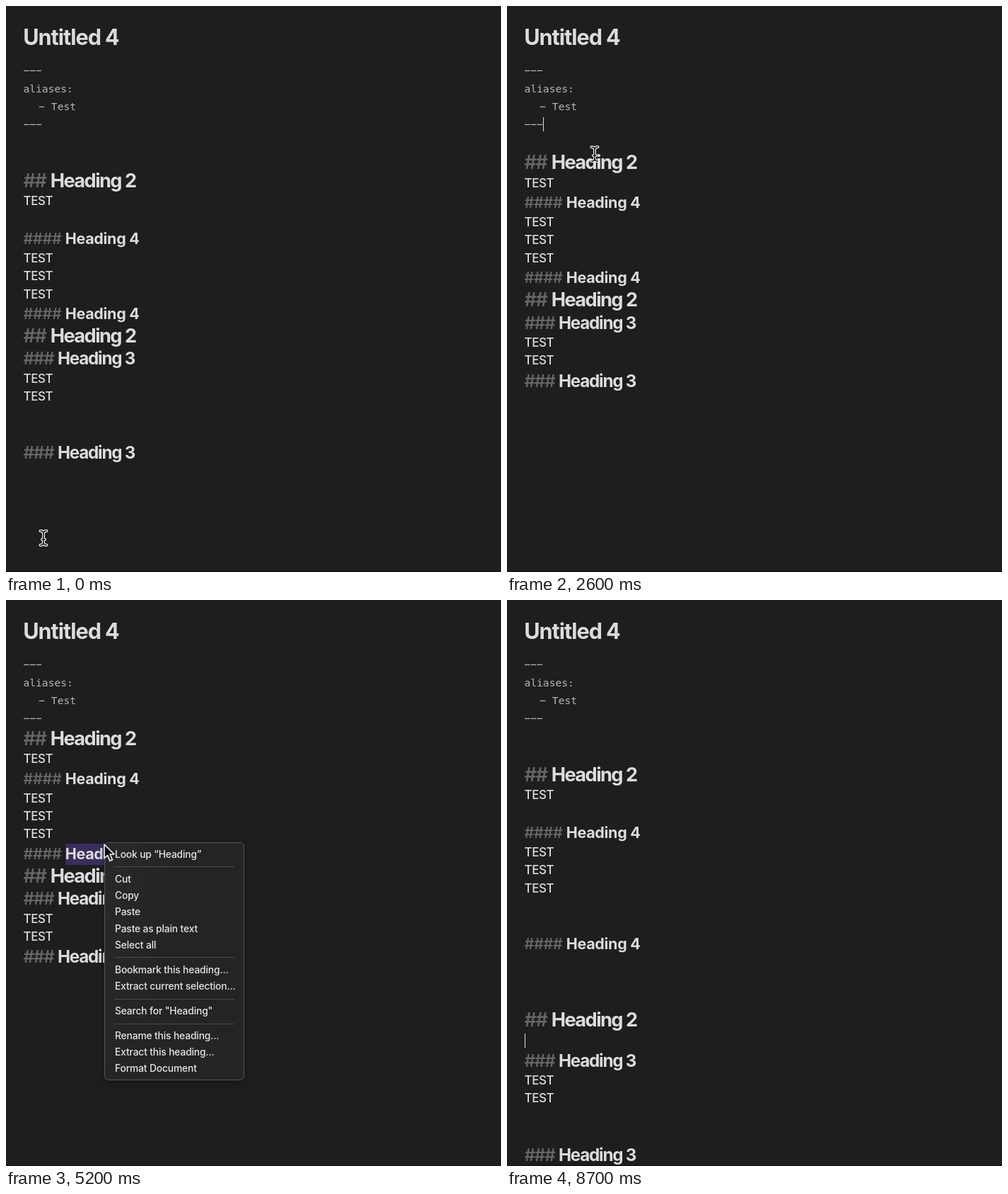
An HTML page for the animation above (8800 ms loop, 700 by 799 pixels).

```html
<!DOCTYPE html>
<html lang="en">
<head>
<meta charset="utf-8">
<title>Format headings</title>
<style>
  html, body { margin: 0; width: 100%; height: 100%; overflow: hidden; background: #1e1e1e; }
  #stage { position: relative; width: 700px; height: 799px; overflow: hidden; color: #dcdcdc;
    font: 450 17px/25.4px Inter, sans-serif; font-optical-sizing: none; white-space: pre; }
  #stage > * { position: absolute; }
  #title { left: 24.2px; top: 24px; font-size: 30.6px; line-height: 40px; font-weight: 700; letter-spacing: -.034em; }
  #yaml { left: 24.5px; top: 78.2px; color: #b6b6b6; font: 14.6px/25.4px "DejaVu Sans Mono", monospace; }
  #yaml .item { padding-left: 21.8px; }
  #doc { left: 24.5px; top: 179.9px; }
  #doc div { position: relative; height: 25.4px; letter-spacing: -.024em; }
  #doc .h { color: #666; font-weight: 600; }
  #doc b { position: absolute; top: 0; color: #dcdcdc; font-weight: 700; }
  #doc i { display: inline-block; font-style: normal; }
  #doc .h2 { font-size: 27.2px; height: 32.5px; line-height: 32.5px; letter-spacing: -.057em; }
  #doc .h3 { font-size: 24.2px; height: 31.35px; line-height: 31.35px; letter-spacing: -.05em; }
  #doc .h4 { font-size: 21.5px; height: 29.9px; line-height: 29.9px; letter-spacing: -.014em; }
  .h2 b { left: 38.2px; } .h3 b { left: 48.4px; } .h4 b { left: 59.2px; }
  #doc .picked { background: #3a2e5c; }
  #caret { position: absolute; width: 1px; height: 20px; margin-top: 2.7px; background: #e0e0e0; }
  #menu { left: 139px; top: 342.4px; width: 198px; height: 335.6px; box-sizing: border-box; padding: 4.4px;
    border: 1px solid #555; border-radius: 6px; background: linear-gradient(100deg, #292929, #242424 40%);
    box-shadow: 0 3px 10px #0005; color: #e6e6e6; font-size: 13.8px; line-height: 23.3px; letter-spacing: -.01em; }
  #menu div { height: 23.3px; padding-left: 9.6px; border-radius: 4px; }
  #menu .on { background: #1467c6; color: #fff; }
  #menu hr { height: 1px; margin: 5.3px 9px; border: 0; background: #4b4b4b; }
  #edge { left: 0; top: 798px; width: 700px; height: 1px; background: #101010; }
  #mouse { left: 0; top: 0; width: 32px; height: 32px; overflow: visible; }
  #beam { fill: none; stroke: #f2f2f2; stroke-width: 4; stroke-linecap: round; }
  #beam .core { stroke: #1a1a1a; stroke-width: 1.6; }
</style>
</head>
<body>
<div id="stage">
  <div id="title">Untitled 4</div>
  <div id="yaml"><div>−−−</div><div>aliases:</div><div class="item">− Test</div><div>−−−</div></div>
  <div id="doc"></div>
  <div id="menu"></div>
  <div id="edge"></div>
  <svg id="mouse">
    <g id="beam"></g>
    <path id="arrow" fill="#0a0a0a" stroke="#f2f2f2" stroke-width="1.4" stroke-linejoin="round"
      transform="scale(1.15)" d="M0 0V17L4 13.4 7 20.3 10 19 7 12.2H12.2Z"/>
  </svg>
</div>
<script>
const LOOP = 8800, STEP = 100, GLIDE = 500, BLINK = 500;
const DOC_TOP = 179.9, HEIGHTS = { 2: 32.5, 3: 31.35, 4: 29.9 }, LINE = 25.4;

const $ = id => document.getElementById(id);
const show = (el, on) => el.style.display = on ? "" : "none";
const doc = $("doc"), menu = $("menu"), mouse = $("mouse");
const caret = document.createElement("span");
caret.id = "caret";

const beam = "M-4.5-10Q0-10 0-6.5V6.5Q0 10-4.5 10M4.5-10Q0-10 0-6.5M4.5 10Q0 10 0 6.5M-2 2H2";
$("beam").innerHTML = `<path d="${beam}"/><path class="core" d="${beam}"/>`;

menu.innerHTML = [
  ["Look up “Heading”"],
  ["Cut", "Copy", "Paste", "Paste as plain text", "Select all"],
  ["Bookmark this heading...", "Extract current selection..."],
  ['Search for "Heading"'],
  ["Rename this heading...", "Extract this heading...", "Format Document"]
].map(group => group.map(s => `<div>${s}</div>`).join("")).join("<hr>");

// One character per line: a digit is a heading of that level, T is text, a dot is blank.
const START = "..2T.4TTT423TT..3";

// What the user does; steps with a point bring the mouse there by that time.
const steps = [
  { at: 0, act: "hover", to: [53, 751] },
  { at: 400, act: "hover", to: [206, 640] },
  { at: 800, act: "click", to: [150, 603] },
  { at: 1000, act: "backspace" },
  { at: 1200, act: "backspace" },
  { at: 1700, act: "click", to: [78, 298] },
  { at: 1900, act: "backspace" },
  { at: 2300, act: "click", to: [70, 194] },
  { at: 2500, act: "backspace" },
  { at: 2600, act: "hover", to: [124, 209] },
  { at: 2700, act: "del" },
  { at: 3100, act: "click", to: [47, 169] },
  { at: 3800, act: "enter" },
  { at: 4400, act: "backspace" },
  { at: 5200, act: "menu", to: [139, 345] },
  { at: 5500, act: "hover", to: [195, 684] },
  { at: 5700, act: "hover", to: [209.5, 666] },
  { at: 6000, act: "format" },
  { at: 6500, act: "hover", to: [422, 615] },
  { at: 6700, act: "click", to: [422, 615] },
  { at: 8000, act: "leave", to: [492, 186] }
];
const moves = steps.filter(s => s.to);

const cut = (s, row) => s.slice(0, row) + s.slice(row + 1);

function rowAt(lines, y) {
  let row = -1;
  for (let bottom = DOC_TOP; bottom <= y; bottom += HEIGHTS[lines[row]] || LINE) row++;
  return row;
}

// Later headings of a level get one blank line more than the first.
function formatted(lines) {
  const seen = new Set();
  return lines.replace(/\./g, "").replace(/\d/g, level => {
    const blanks = (level === "2" ? 2 : 1) + seen.has(level);
    seen.add(level);
    return ".".repeat(blanks) + level;
  });
}

const acts = {
  hover() {},
  click(s, [, y]) { s.row = rowAt(s.lines, y); },
  backspace(s) { s.lines = cut(s.lines, s.row--); s.typing = true; },
  del(s) { s.lines = cut(s.lines, s.row + 1); s.typing = true; },
  enter(s) { s.row++; s.lines = s.lines.slice(0, s.row) + "." + s.lines.slice(s.row); s.typing = true; },
  menu(s, [, y]) { s.open = true; s.row = rowAt(s.lines, y); },
  format(s) { s.open = false; s.row = null; s.lines = formatted(s.lines); },
  leave(s) { s.typing = true; }
};

function replay(t) {
  const s = { lines: START, row: null, open: false, typing: false, since: 0 };
  for (const { at, act, to } of steps) {
    if (at > t) break;
    s.typing = false;
    acts[act](s, to);
    if (act !== "hover" && act !== "leave") s.since = at;
  }
  return s;
}

function mouseAt(t) {
  const i = moves.findLastIndex(m => m.at <= t), a = moves[i], b = moves[i + 1];
  if (!b) return { point: a.to, moving: false };
  const start = Math.max(a.at, b.at - GLIDE);
  const u = Math.max(0, (t - start) / (b.at - start)), e = u * u * (3 - 2 * u);
  return { point: a.to.map((v, k) => v + (b.to[k] - v) * e), moving: t >= start };
}

function lineHTML(kind) {
  if (kind === ".") return "<div></div>";
  if (kind === "T") return "<div>TEST</div>";
  return `<div class="h h${kind}">${"#".repeat(kind)}<b><i>Heading</i> ${kind}</b></div>`;
}

let shown;
function draw() {
  const t = Math.floor(performance.now() % LOOP / STEP) * STEP;
  const { lines, row, open, typing, since } = replay(t);
  if (lines !== shown) doc.innerHTML = [...lines].map(lineHTML).join("");
  shown = lines;

  doc.querySelectorAll("i").forEach(el =>
    el.className = open && el.closest("div") === doc.children[row] ? "picked" : "");
  show(caret, row !== null && !open && (t - since) % (2 * BLINK) < BLINK);
  if (row !== null) (doc.children[row] || $("yaml").lastElementChild).append(caret);

  const { point: [x, y], moving } = mouseAt(t);
  show(menu, open);
  for (const el of menu.querySelectorAll("div")) {
    const box = el.getBoundingClientRect();
    el.className = y >= box.top && y < box.bottom ? "on" : "";
  }
  show(mouse, moving || !typing);
  show($("beam"), !open);
  show($("arrow"), open);
  mouse.style.transform = `translate(${x}px, ${y}px)`;
  requestAnimationFrame(draw);
}
draw();
</script>
</body>
</html>
```
